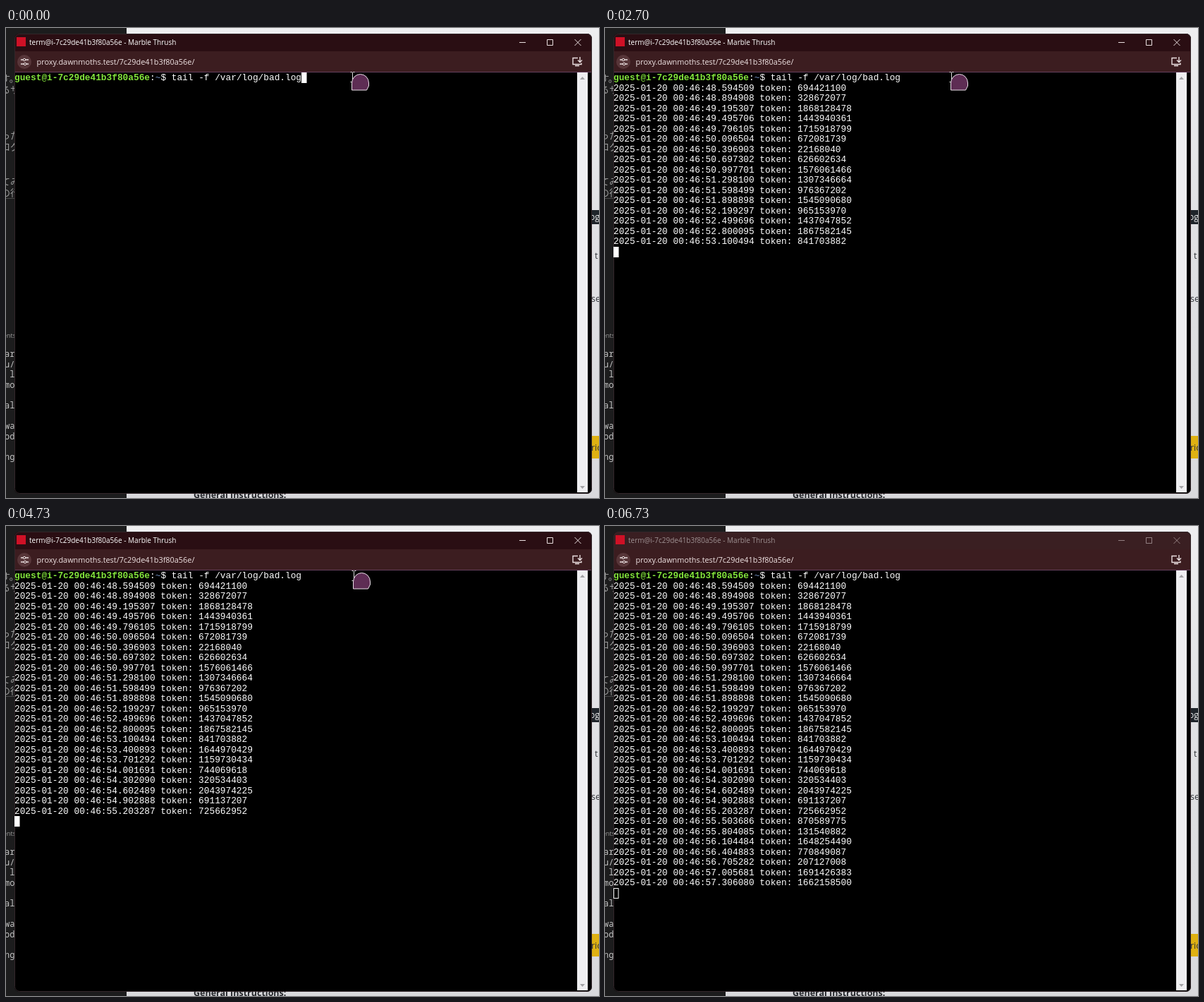
Animation, 841 px wide and 666 px high, one loop 6760 ms. Source, as an HTML page:

```html
<!DOCTYPE html>
<html lang="en">
<head>
<meta charset="utf-8">
<title>Log tail</title>
<style>
html, body { margin: 0; width: 100%; height: 100%; overflow: hidden; background: #1c1c1d; }
svg { display: block; width: 841px; height: 666px; }
text { white-space: pre; }
.ui { font-family: "Open Sans", "Noto Sans", sans-serif; }
.term { font: 12.8px "Liberation Mono", "Courier New", monospace; fill: #fff; }
.code { font: 12px "Noto Sans Mono", monospace; fill: #c4c4c4; }
.jp { font: 13px "Noto Sans CJK JP", "Noto Sans CJK", sans-serif; fill: #9d9d9d; }
.line { fill: none; stroke: #eadfe0; }
</style>
</head>
<body>
<svg viewBox="0 0 841 666">
  <defs>
    <linearGradient id="page" x2="0" y2="1">
      <stop offset="0" stop-color="#eeeef0"/>
      <stop offset=".4" stop-color="#e1e1e4"/>
      <stop offset="1" stop-color="#d9d9dc"/>
    </linearGradient>
    <clipPath id="frame"><rect x="12" y="8" width="819" height="652" rx="7"/></clipPath>
  </defs>

  <!-- pages behind the window -->
  <rect width="171" height="666" fill="#1c1c1d"/>
  <rect x="171" width="670" height="666" fill="url(#page)"/>
  <g id="behind"></g>
  <path d="M0 241.500H12" stroke="#4a4a4a"/>
  <text class="ui" x="266" y="666" font-size="12.500" font-weight="700" fill="#25272b">General Instructions:</text>
  <rect x="826" y="258" width="15" height="20" fill="#1f242a"/>
  <rect x="826" y="578" width="15" height="32" fill="#dfb112"/>
  <g class="ui" font-size="12.500" fill="#303338">
    <text x="828" y="272" font-size="12" fill="#f2f2f2">og</text>
    <text x="835" y="327">t</text>
    <text x="830" y="388">se</text>
    <text x="830" y="599">ric</text>
  </g>

  <!-- window -->
  <g clip-path="url(#frame)">
    <rect x="12" y="8" width="819" height="652" fill="#000"/>
    <rect id="bar" x="12" y="8" width="819" height="25"/>
    <rect x="12" y="33" width="819" height="29" fill="#3c1d20"/>
    <rect x="12" y="62" width="819" height="1" fill="#66405e"/>
    <rect x="810" y="63" width="15" height="595" fill="#efeff1"/>
    <path d="M814 73l3.500-4 3.500 4zM814 649l3.500 4 3.500-4z" fill="#a2a2a5"/>
  </g>
  <rect x="12.500" y="8.500" width="818" height="651" rx="7" fill="none" stroke="#33262a"/>

  <rect x="15" y="13" width="13" height="13" fill="#cf1126"/>
  <g id="controls">
    <text class="ui" id="title" x="33" y="24" font-size="10" font-weight="500" fill="#fff"></text>
    <path class="line" d="M728 20.500h9M767.500 16.500h8v8h-8zM806.500 16l9 9M815.500 16l-9 9"/>
  </g>
  <circle cx="26" cy="48" r="10" fill="#573639"/>
  <path class="line" stroke-width="1.300" d="M21 45h3M28 45h4M21 51h4M29 51h3"/>
  <circle class="line" cx="26" cy="45" r="1.700"/>
  <circle class="line" cx="27" cy="51" r="1.700"/>
  <text class="ui" id="address" x="43.500" y="52" font-size="10.900" fill="#f0e4e4"></text>
  <path class="line" stroke-width="1.400" d="M811 42.500h-7v9h12v-2M807 53.500h6M814 41v7M811 45.500l3 3 3-3"/>

  <text class="term" x="12" y="74"><tspan id="user" fill="#84e63c" font-weight="700"></tspan>:<tspan fill="#7290c4">~</tspan>$ tail -f /var/log/bad.log</text>
  <g id="log"></g>
  <rect id="caret" width="6.500" height="14" stroke="#fff"/>

  <g id="pointer">
    <path d="M488.500 62.500h2l1 1 1-1h2M491.500 63v13M488.500 76.500h2l1-1 1 1h2" fill="none" stroke="#ddd"/>
    <path d="M490.500 88V78a12 12.500 0 0 1 24 0v4l-3 6z" fill="#5e2d54" stroke="#e9dfe7"/>
  </g>
</svg>
<script>
const LOOP = 6760;
const BLUR_AT = 6600;
const MOVE_AT = 4270;
const ROW = 14.5;
const CHAR = 7.68;
const PROMPT_CHARS = 53;
const HOST = "i-7c29de41b3f80a56e";

const ENTRIES = 30;
const FIRST_BATCH = 10;
const BATCH_AT = 670;
const WRITE_EVERY = 300;
const POLL_EVERY = 105;

const byId = id => document.getElementById(id);
const [log, caret, pointer, bar, controls, behind] =
  ["log", "caret", "pointer", "bar", "controls", "behind"].map(byId);

function setAttrs(node, attrs) {
  for (const name in attrs) node.setAttribute(name, attrs[name]);
}

function addText(parent, className, x, y, content) {
  const node = document.createElementNS("http://www.w3.org/2000/svg", "text");
  setAttrs(node, { class: className, x, y });
  node.textContent = content;
  parent.append(node);
  return node;
}

function addBlock(className, x, y, pitch, lines) {
  lines.split("|").forEach((words, i) => addText(behind, className, x, y + i * pitch, words));
}

byId("title").textContent = `term@${HOST} - Marble Thrush`;
byId("address").textContent = `proxy.dawnmoths.test/${HOST.slice(2)}/`;
byId("user").textContent = `guest@${HOST}`;

addBlock("jp", -7, 76, 16.2, "す。|るサ||||った|ログ|||てみ|の行");
addBlock("code", -2, 466, 14.6, "ary|u/| lo|mod||al||wa|odu||ng");
addText(behind, "ui", -4, 439, "ents").setAttribute("style", "font-size:9px;fill:#9a9a9a");

// Each token is the next state of a Lehmer generator.
let token = 694421100;
const rows = Array.from({ length: ENTRIES }, (_, i) => {
  const seconds = (48.594509 + i * 0.300399).toFixed(6);
  const row = addText(log, "term", 12, 74 + ROW * (i + 1), `2025-01-20 00:46:${seconds} token: ${token}`);
  token = token * 48271 % 2147483647;
  return row;
});

// The first lines come as one batch; later ones show at the next poll after being written.
function arrival(n) {
  if (n <= FIRST_BATCH) return BATCH_AT;
  const written = BATCH_AT + (n - FIRST_BATCH) * WRITE_EVERY;
  return Math.ceil(written / POLL_EVERY) * POLL_EVERY;
}

function draw(time) {
  const count = rows.filter((_, i) => time >= arrival(i + 1)).length;
  rows.forEach((row, i) => { row.style.display = i < count ? "" : "none"; });

  const focused = time < BLUR_AT;
  const column = count ? 0 : PROMPT_CHARS;
  const line = count ? count + 1 : 0;
  setAttrs(caret, {
    x: Math.round(12 + column * CHAR) + 0.5,
    y: Math.round(63 + line * ROW) + 0.5,
    fill: focused ? "#fff" : "none"
  });

  bar.setAttribute("fill", focused ? "#2a0e13" : "#3a1f22");
  controls.setAttribute("opacity", focused ? 1 : 0.5);
  pointer.style.display = focused ? "" : "none";
  pointer.setAttribute("transform", time < MOVE_AT ? "" : "translate(2 1)");
}

const start = performance.now();
function tick() {
  draw((performance.now() - start) % LOOP);
  requestAnimationFrame(tick);
}
tick();
</script>
</body>
</html>
```
